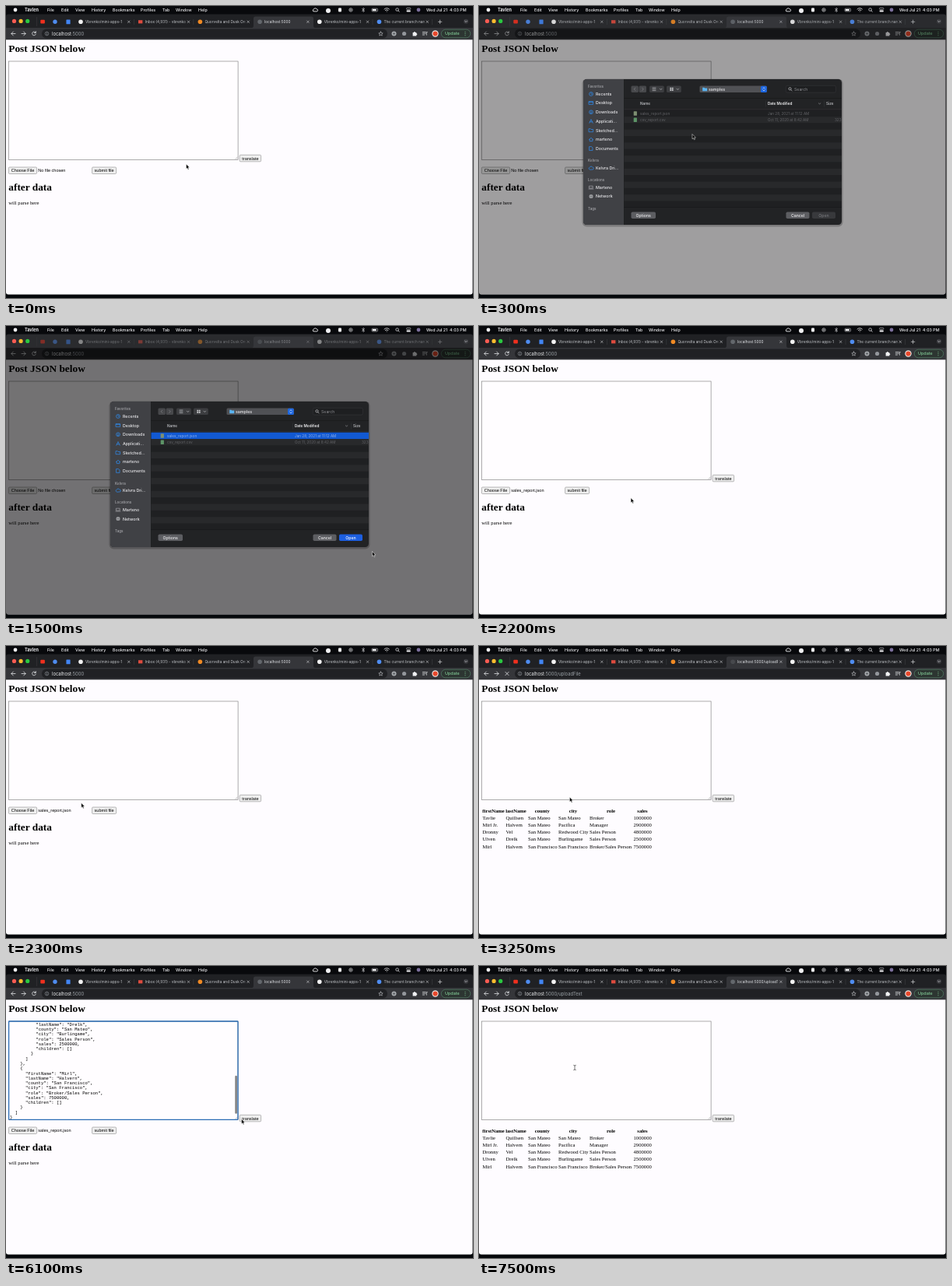
An HTML page that plays this animation: 600 by 375 pixels, repeating every 7.8 s.

```html
<!DOCTYPE html>
<html lang="en">
<head>
<meta charset="utf-8">
<title>JSON upload demo</title>
<style>
html, body { margin: 0; width: 100%; height: 100%; overflow: hidden; background: #05080b; }
svg { display: block; }
#stage { width: 100%; height: 100%; }
text { white-space: pre; font-family: Inter, Roboto, sans-serif; }
.serif { font-family: "Liberation Serif", "Noto Serif", serif; }
.arial { font-family: "Liberation Sans", sans-serif; }
.mono { font-family: "Liberation Mono", "DejaVu Sans Mono", monospace; }
</style>
</head>
<body>
<svg id="stage" viewBox="0 0 600 375" preserveAspectRatio="none" xmlns="http://www.w3.org/2000/svg"></svg>
<script>
const LOOP = 7800, STEP = 50;
const stage = document.getElementById('stage');

// Markup helpers
const text = (x, y, s, size, fill, extra = '') =>
  `<text x="${x}" y="${y}" font-size="${size}" fill="${fill}" ${extra}>${s}</text>`;
const rect = (x, y, w, h, fill, r = 0, extra = '') =>
  `<rect x="${x}" y="${y}" width="${w}" height="${h}" rx="${r}" fill="${fill}" ${extra}/>`;
const dot = (x, y, r, fill, extra = '') => `<circle cx="${x}" cy="${y}" r="${r}" fill="${fill}" ${extra}/>`;
const line = (d, color, w = 0.7, extra = '') =>
  `<path d="${d}" fill="none" stroke="${color}" stroke-width="${w}" stroke-linecap="round" stroke-linejoin="round" ${extra}/>`;
const group = (id, body, extra = '') => `<g id="${id}" ${extra}>${body}</g>`;
const BOLD = 'font-weight="600"', MID = 'text-anchor="middle"';

function menuBar() {
  const items = [['File', 53], ['Edit', 71], ['View', 89], ['History', 110], ['Bookmarks', 137],
    ['Profiles', 173], ['Tab', 201], ['Window', 218], ['Help', 247]];
  const w = '#f0f0f2';
  return rect(0, 0, 600, 10.5, '#08090c') + dot(12, 5, 2.4, w) +
    text(24, 7, 'Tavlen', 5.5, w, 'font-weight="700"') +
    items.map(([s, x]) => text(x, 7, s, 5.3, w, 'font-weight="500"')).join('') +
    line('M394.5 6.5a1.6 1.6 0 0 1 1-2.5a2 2 0 0 1 3.6 0a1.5 1.5 0 0 1 0 3z', w, 0.9) +
    dot(414, 6, 3, w) +
    rect(427, 2.4, 4, 5, w, 1) +
    dot(443, 5, 2.2, 'none', `stroke="${w}" stroke-width=".6"`) + line('M442.4 4L444.3 5L442.4 6z', w, 0.5) +
    line('M457.6 3.6L460.6 6.3L459 7.6V2.4L460.6 3.7L457.6 6.4', w, 0.55) +
    rect(470, 3.2, 7.5, 3.8, 'none', 0.9, `stroke="${w}" stroke-width=".5"`) + rect(470.8, 4, 5, 2.2, w, 0.4) +
    line('M486 4a4.4 4.4 0 0 1 6.4 0M487.4 5.5a2.6 2.6 0 0 1 3.6 0M489.2 7h.1', w, 0.8) +
    dot(502.6, 4.6, 1.8, 'none', `stroke="${w}" stroke-width=".7"`) + line('M504 6L505.3 7.3', w) +
    rect(514.5, 2.4, 5.4, 2.1, 'none', 1, `stroke="${w}" stroke-width=".5"`) +
    rect(514.5, 5.4, 5.4, 2.1, w, 1) +
    dot(530, 5, 2.4, '#7c6f9c') +
    text(540, 7, 'Wed Jul 21  4:03 PM', 5.3, w, 'font-weight="500"');
}

function tabStrip() {
  const tabs = [['Vbrenko/mini-apps-1', '#f2f2f2'], ['Inbox (4,931) - vbrenko', '#dd4b3e', 1],
    ['Quorvelta and Dusk Orchard', '#f08a24'], ['localhost:5000', '#63676c'],
    ['Vbrenko/mini-apps-1', '#f2f2f2'], ['The current branch name', '#4f8cf0']];
  let s = rect(39, 14, 0.4, 12, '#44464a');
  s += rect(44.3, 17.8, 5.6, 4.6, '#f0301e', 1) + dot(63, 20.3, 2.7, '#4f8cf0') + rect(77.4, 17.5, 5.2, 5.8, '#4285f4', 0.6);
  tabs.forEach(([title, color, square], i) => {
    const x = 96 + 76.7 * i, on = i === 3, cx = x + 61.8;
    s += square ? rect(x - 2.7, 18.2, 5.4, 4.2, color) : dot(x, 20.3, 2.8, color, on ? 'id="favicon"' : '');
    s += `<svg x="${x + 6}" y="14" width="52" height="13">` +
      text(0, 8.1, title, 4.75, on ? '#e4e6ea' : '#c3c6ca', on ? 'id="tabTitle"' : '') + '</svg>';
    s += line(`M${cx - 1.3} 19l2.6 2.6m0-2.6l-2.6 2.6`, '#cfd1d4', 0.6);
    if (i !== 2 && i !== 3) s += rect(x + 68, 17, 0.4, 7, '#4a4c50');
  });
  return s + line('M555.4 20.3h4.4M557.6 18.1v4.4', '#d5d7da');
}

function browser() {
  const w = '#e3e5e8', g = '#9aa0a6';
  const lights = ['#fb5b52', '#fbbc2e', '#2ac840'].map((c, i) => dot(10.5 + 8.6 * i, 19.4, 2.6, c)).join('');
  return rect(0, 10.5, 600, 20, '#202124', 3, 'id="strip"') +
    '<path d="M315 28.2q3 0 3-3v-9q0-2.6 2.6-2.6h71.8q2.6 0 2.6 2.6v9q0 3 3 3z" fill="#35363a"/>' +
    lights + group('tabs', tabStrip()) +
    dot(591, 19.8, 3, '#3c3d41') + line('M589.6 19.2l1.4 1.4l1.4-1.4', w, 0.6) +
    rect(0, 28, 600, 15.3, '#35363a') +
    line('M12 35.5H7M9.3 33L6.8 35.5L9.3 38M20 35.5h5M22.7 33l2.5 2.5l-2.5 2.5', w, 0.8) +
    line('M38 34a2.4 2.4 0 1 0 .3 2.2M38.3 32.6v1.9h-1.9', w, 0.8, 'id="reload"') +
    line('M33.9 33.4l4.2 4.2m0-4.2l-4.2 4.2', w, 0.8, 'id="stop"') +
    rect(46, 29.6, 444, 11.8, '#202124', 5.9) +
    dot(52.5, 35.5, 2.3, 'none', `stroke="${g}" stroke-width=".6"`) + line('M52.5 35.4v1.2M52.5 34.2v.05', g, 0.6) +
    text(59, 37.6, `localhost<tspan id="path" fill="${g}"></tspan>`, 5.83, '#eceef0') +
    line('M481.5 32.9l.8 1.8l1.9.2l-1.4 1.3l.4 1.9l-1.7-1l-1.7 1l.4-1.9l-1.4-1.3l1.9-.2z', w, 0.5) +
    dot(498.5, 35.5, 3, '#a5a8ac') + dot(498.5, 35.5, 1.2, '#55585c') +
    dot(511.6, 35.5, 2.6, '#94979c') +
    '<path d="M522.6 34h1.3a1 1 0 0 1 2 0h1.4v1.3a1 1 0 0 1 0 2v1.3h-4.7z" fill="#f1f2f4"/>' +
    line('M535.3 33.5h4M535.3 35.3h4M535.3 37.1h2.2M540.3 37.3v-3.8h1', w) +
    dot(551.5, 35.5, 4.2, '#eceae8') + dot(551.5, 35.5, 3.1, '#e8472b') +
    rect(559.3, 30.2, 37.4, 10.6, '#2c3531', 5.3, 'stroke="#5f9f78" stroke-width=".5"') +
    text(564, 37.4, 'Update', 5.4, '#81c995', 'font-weight="500"') +
    [33.2, 35.5, 37.8].map(y => dot(590, y, 0.55, '#81c995')).join('');
}

const button = (x, y, w, label) =>
  rect(x, y, w, 8.5, '#efefef', 1.2, 'stroke="#767676" stroke-width=".5"') +
  text(x + w / 2, y + 6.2, label, 5.55, '#000', `class="arial" ${MID}`);
const heading = (y, s) => text(3.3, y, s, 13.33, '#000', 'class="serif" font-weight="700"');

// Records: first, last, county, city, role, sales
const KEYS = ['firstName', 'lastName', 'county', 'city', 'role', 'sales'];
const SM = 'San Mateo', SF = 'San Francisco', SP = 'Sales Person';
const people = [
  ['Tavlie', 'Quillsen', SM, SM, 'Broker', 1000000],
  ['Mirl Jr.', 'Halvern', SM, 'Pacifica', 'Manager', 2900000],
  ['Dronny', 'Vel', SM, 'Redwood City', SP, 4800000],
  ['Ulven', 'Drelk', SM, 'Burlingame', SP, 2500000],
  ['Mirl', 'Halvern', SF, SF, 'Broker/Sales Person', 7500000]
];
const node = (i, children = []) => ({ ...Object.fromEntries(KEYS.map((k, c) => [k, people[i][c]])), children });
const report = node(0, [node(1, [node(2), node(3)]), node(4)]);

const LINE = 6.27;
const jsonLines = JSON.stringify(report, null, 2).split('\n');
const scrollMax = 77 + (jsonLines.length - 1) * LINE - 196;

function jsonText() {
  return jsonLines.map((s, i) => {
    const body = s.trimStart();
    return text(5 + (s.length - body.length) * 3.33, 77 + i * LINE, body, 5.55, '#000', 'class="mono"');
  }).join('');
}

function table() {
  const left = [4.5, 34.5, 63, 102, 142, 198.5], mid = [18.6, 47.5, 81.3, 121, 169.5, 210];
  return KEYS.map((k, c) => text(mid[c], 213.8, k, 6.67, '#000', `class="serif" font-weight="700" ${MID}`)).join('') +
    people.map((p, r) => p.map((v, c) =>
      text(left[c], 223 + 9.15 * r, v, 6.67, '#000', 'class="serif"')).join('')).join('');
}

function page() {
  const form = button(3.4, 207, 36.2, 'Choose File') +
    text(41.3, 213.1, '', 5.55, '#000', 'class="arial" id="fileName"') +
    button(110.6, 207, 31, 'submit file') + heading(236.7, 'after data') +
    text(3.3, 254.9, 'will parse here', 6.67, '#000', 'class="serif"');
  return '<path d="M0 43.2H599.5V367.5q0 3-3 3H3q-3 0-3-3z" fill="#fefcff"/>' +
    heading(59, 'Post JSON below') +
    rect(3.5, 71, 294.6, 126.4, '#fffdff', 0, 'stroke="#767676" stroke-width=".6"') +
    line('M294.7 196.5l2.6-2.6M296.2 196.5l1.1-1.1', '#8a8a8a', 0.4) +
    `<g clip-path="url(#areaClip)">${group('json', jsonText())}</g>` +
    rect(294.3, 0, 2.6, 49, '#808080', 1.3, 'id="thumb"') +
    rect(5, 72.4, 0.5, 6, '#000', 0, 'id="caret"') +
    rect(3.6, 71, 294.4, 126.4, 'none', 0.8, 'id="focus" stroke="#2a6cb4" stroke-width="1.3"') +
    button(300.2, 191.3, 27.4, 'translate') +
    group('form', form) + group('table', table());
}

function dialog() {
  const pale = '#e9e9ec', dim = '#8d8e92', blue = '#2f8ff2';
  const side = [['Recents', 116], ['Desktop', 127.6], ['Downloads', 139.3], ['Applicati...', 151], ['Sketched...', 162.7],
    ['marteno', 174.4], ['Documents', 186], ['Kelvra Dri...', 211], ['Marteno', 236], ['Network', 247.6]];
  const box = (y, d) => line(d.replace('Y', y), blue, 0.7);
  const icons = [
    dot(144, 116, 2.4, 'none', `stroke="${blue}" stroke-width=".7"`) + line('M144 114.6v1.6h1.2', blue, 0.6),
    box(125.6, 'M141.4 Yh5.2v3.8h-5.2zm0 1h5.2'),
    dot(144, 139.3, 2.4, 'none', `stroke="${blue}" stroke-width=".7"`) + line('M144 138v2.6m-1.1-1l1.1 1.1l1.1-1.1', blue, 0.6),
    line('M141.8 153.2l2.2-4.6l2.2 4.6M142.4 151.8h3.2', blue),
    box(160.7, 'M141.4 Yh2l.6.8h2.6v3.2h-5.2z'),
    line('M141.4 174.6l2.6-2.4l2.6 2.4M142.2 174.2v2.4h3.6v-2.4', blue),
    box(183.6, 'M142 Yh2.6l1.4 1.4v3.4h-4z'),
    line('M142 213a1.5 1.5 0 0 1 .3-2.8a2 2 0 0 1 3.6 0a1.4 1.4 0 0 1 .2 2.8z', blue),
    line('M141.8 234.2h4.4v2.8h-4.4zM141 238h6', '#b5b6ba', 0.6),
    dot(144, 247.6, 2.5, '#a5a6aa') + line('M141.6 247.6h4.8M144 245.2v4.8', '#55565a', 0.4)
  ].join('');
  const heads = [['Favorites', 108], ['Kelvra', 203.5], ['Locations', 228], ['Tags', 265]];
  const push = (x, w, label, fill, color, id) =>
    rect(x, 267.4, w, 8.6, fill, 1.8, id ? `id="${id}"` : '') +
    text(x + w / 2, 273.6, label, 5.2, color, `${MID} font-weight="500" ${id ? `id="${id}Label"` : ''}`);
  let rows = '';
  for (let i = 0; i < 15; i++) rows += rect(186.5, 136.7 + 8.35 * i, 279.5, 8.35, i % 2 ? '#28292b' : '#1f2022');
  const row = (y, name, date, id) => group(id, text(207, y, name, 4.75, 'inherit').replace(' fill="inherit"', '') +
    text(371, y, date, 4.65, 'inherit').replace(' fill="inherit"', ''), 'fill="#626367"');
  return rect(132.5, 96.5, 335, 190, '#000', 6, 'opacity=".22"') +
    rect(134, 97, 332, 187, '#222325', 4.5) +
    '<path d="M186.3 97h-47.8q-4.5 0-4.5 4.5v178q0 4.5 4.5 4.5h47.8z" fill="#404145"/>' +
    rect(186.3, 97, 0.4, 187, '#111214') +
    heads.map(([s, y]) => text(140, y, s, 4.5, '#9b9ca0', BOLD)).join('') + icons +
    side.map(([s, y]) => text(150, y + 1.9, s, 5.3, pale, 'font-weight="500"')).join('') +
    rect(195.5, 105.5, 9.4, 8.6, '#47484b', 1.5) + rect(205.6, 105.5, 9.4, 8.6, '#47484b', 1.5) +
    line('M200.8 108.2l-1.6 1.6l1.6 1.6M209.7 108.2l1.6 1.6l-1.6 1.6', '#85868a') +
    rect(219, 105.5, 18.8, 8.6, '#3c3d40', 1.5) + rect(241, 105.5, 18.8, 8.6, '#3c3d40', 1.5) +
    line('M223 108h4M223 109.8h4M223 111.6h4M232.4 109.2l1.3 1.3l1.3-1.3M254 109.2l1.3 1.3l1.3-1.3', '#cfd0d3', 0.6) +
    [0, 1, 2, 3].map(i => rect(245.4 + 2.4 * (i % 2), 107.8 + 2.3 * (i >> 1), 1.8, 1.8, '#cfd0d3')).join('') +
    rect(283.5, 105.5, 86.5, 8.6, '#505155', 1.6) + rect(362, 105.7, 7.8, 8.2, '#1d66e0', 1.5) +
    line('M364.7 109l1.3-1.3l1.3 1.3M364.7 110.7l1.3 1.3l1.3-1.3', '#fff', 0.6) +
    '<path d="M287.2 107.7h2.2l.7.8h3.1v3.7h-6z" fill="#5bb5f2"/>' +
    text(295, 111.7, 'samples', 5.3, pale, 'font-weight="500"') +
    rect(394.3, 105.3, 64, 8.8, '#1e1f21', 1.6, 'stroke="#3a3b3e" stroke-width=".5"') +
    dot(399.5, 109.3, 1.6, 'none', `stroke="${pale}" stroke-width=".6"`) + line('M400.7 110.6l1.4 1.4', pale, 0.6) +
    text(405, 111.6, 'Search', 5.2, dim) +
    rect(186.5, 121.5, 279.5, 0.4, '#111214') +
    text(207, 129.9, 'Name', 4.65, '#b5b6ba', BOLD) + text(371, 129.9, 'Date Modified', 4.65, '#f2f2f4', BOLD) +
    line('M436.3 127.8l1.3 1.1l1.3-1.1', '#b5b6ba', 0.5) + text(446, 129.9, 'Size', 4.65, '#b5b6ba', BOLD) +
    rect(368, 124.5, 0.4, 8, '#3c3d40') + rect(443, 124.5, 0.4, 8, '#3c3d40') +
    rect(186.5, 135.4, 279.5, 0.4, '#38393c') + rows +
    rect(186.5, 136.7, 279.5, 8.35, '#1259d2', 0, 'id="picked"') +
    rect(198.7, 138.2, 4.2, 5.6, '#7e8f72', 0.6) + rect(198.7, 146.5, 4.2, 5.6, '#5d9567', 0.6) +
    row(142.6, 'sales_report.json', 'Jan 28, 2021 at 11:12 AM', 'rowA') +
    row(150.9, 'csv_report.csv', 'Oct 11, 2020 at 8:42 AM', 'rowB') + text(457, 150.9, '323', 4.65, '#626367') +
    rect(186.5, 261, 279.5, 0.4, '#111214') +
    push(195.5, 31.5, 'Options', '#5d5e62', '#f0f0f2') + push(394.5, 30, 'Cancel', '#5d5e62', '#f0f0f2') +
    push(428, 30, 'Open', '#38393c', '#77787c', 'open');
}

stage.innerHTML =
  '<defs><clipPath id="areaClip"><rect x="4" y="71.5" width="290" height="125.6"/></clipPath></defs>' +
  rect(0, 0, 600, 375, '#05080b') + menuBar() + browser() + page() +
  rect(0, 28, 600, 342.5, '#000', 0, 'id="shade"') + group('dialog', dialog()) +
  group('arrow', '<path d="M0 0V6.2L1.4 5L2.4 7.2L3.5 6.7L2.5 4.6L4.4 4.5z" fill="#000" stroke="#fff" stroke-width=".5"/>') +
  group('beam', line('M-1.3-3.2Q0-3.2 0-2.2V2.2Q0 3.2-1.3 3.2M1.3-3.2Q0-3.2 0-2.2M0 2.2Q0 3.2 1.3 3.2', '#222', 0.6));

const el = {};
stage.querySelectorAll('[id]').forEach(e => { el[e.id] = e; });
const set = (id, name, v) => el[id].setAttribute(name, v);
const show = (id, on) => set(id, 'visibility', on ? 'visible' : 'hidden');
const label = (id, s) => { if (el[id].textContent !== s) el[id].textContent = s; };
const within = (t, a, b) => t >= a && t < b;
const ramp = (t, a, b) => Math.min(1, Math.max(0, (t - a) / (b - a)));

// Pointer moves: start, end, x, y; it rests in between
const moves = [
  [0, 0, 231.5, 203], [50, 100, 24, 209], [200, 300, 274, 164.5], [850, 900, 250, 139],
  [900, 1150, 469, 270], [1250, 1500, 470.5, 289.5], [1550, 1850, 441, 269], [1950, 2300, 96.7, 201.5],
  [2450, 2850, 125, 209], [3200, 3550, 65, 104], [3700, 3750, 27, 60], [3850, 3950, 10, 36.5],
  [4500, 4800, 50, 93.5], [5950, 6100, 302.5, 196.5], [7200, 7500, 123, 130.5]
];
function pointer(t) {
  let [, , x, y] = moves[0];
  for (const [a, b, nx, ny] of moves.slice(1)) {
    const p = ramp(t, a, b);
    x += (nx - x) * p;
    y += (ny - y) * p;
  }
  return [x, y];
}

function draw(time) {
  const t = Math.floor(time / STEP) * STEP;

  // File chooser sheet
  const p = t < 250 ? 0 : 1 - (1 - ramp(t, 200, 600)) ** 4;
  const out = 1 - ramp(t, 1950, 2150);
  set('shade', 'opacity', 0.55 * p * out);
  set('dialog', 'opacity', Math.min(1, p * 1.5) * out);
  show('dialog', p * out > 0);
  set('dialog', 'transform', `translate(0 ${-9.5 * (1 - p)})`);
  set('tabs', 'opacity', 1 - (0.2 * p + 0.35 * ramp(t, 1250, 1450)) * out);
  set('strip', 'fill', p * out > 0.5 ? '#2a2b2e' : '#202124');
  const picked = t >= 900;
  show('picked', picked && out > 0);
  set('rowA', 'fill', picked ? '#8fb0ea' : '#626367');
  set('open', 'fill', picked ? '#1d5fe0' : '#38393c');
  set('openLabel', 'fill', picked ? '#fff' : '#77787c');

  // Page and address
  const sent = within(t, 3200, 4400), translated = t >= 6750;
  const route = within(t, 3200, 4200) ? '/uploadFile' : translated ? '/uploadText' : '';
  label('path', ':5000' + route);
  label('tabTitle', 'localhost:5000' + route);
  label('fileName', t < 2100 ? 'No file chosen' : 'sales_report.json');
  show('table', sent || translated);
  show('form', !sent && !translated);
  const loading = within(t, 3000, 3300) || within(t, 4200, 4400) || within(t, 6500, 6800);
  show('stop', loading);
  show('reload', !loading);
  set('favicon', 'opacity', loading ? 0.4 : 1);

  // Text area
  const focused = within(t, 4800, 6750), filled = within(t, 5500, 6750);
  const s = 1 - (1 - ramp(t, 5450, 5800)) ** 3;
  show('focus', focused);
  show('caret', within(t, 5300, 5500));
  show('json', filled);
  show('thumb', filled);
  set('json', 'transform', `translate(0 ${-scrollMax * s})`);
  set('thumb', 'y', 72.5 + 68.3 * s);

  // Pointer
  const beam = within(t, 5100, 6000) || t >= 7400;
  const [x, y] = pointer(t), shift = within(t, 5100, 6000) ? [1.5, 3.5] : [0, 0];
  show('beam', beam);
  show('arrow', !beam);
  set('arrow', 'transform', `translate(${x} ${y})`);
  set('beam', 'transform', `translate(${x + shift[0]} ${y + shift[1]})`);
}

const start = performance.now();
function tick() {
  draw((performance.now() - start) % LOOP);
  requestAnimationFrame(tick);
}
tick();
</script>
</body>
</html>
```
